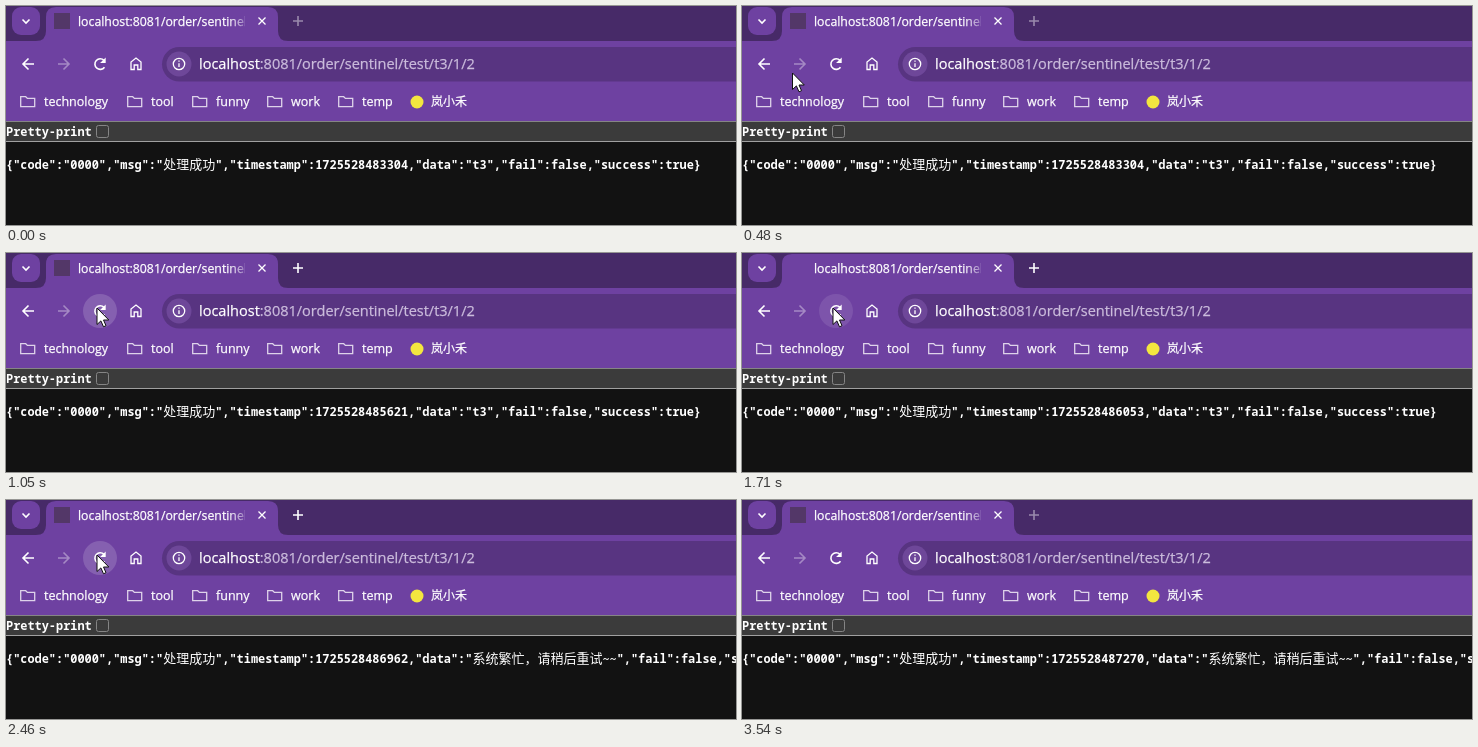
An HTML page for the animation above (3.63 s loop, 730 by 219 pixels).

```html
<!DOCTYPE html>
<html lang="en">
<head>
<meta charset="utf-8">
<title>Reload test</title>
<style>
  html, body { margin: 0; width: 100%; height: 100%; overflow: hidden; background: #121212; }
  svg { display: block; width: 100vw; height: 100vh; }
  text { fill: #fff; white-space: pre; }
  .ui { font-family: "Open Sans", "Noto Sans", "Noto Sans CJK SC", "Noto Sans CJK", sans-serif; stroke: #fff; stroke-width: .25; }
  .mono { font: 600 11.91px "Noto Sans Mono", "DejaVu Sans Mono", monospace; }
  .cjk { font: 500 13px "Noto Sans CJK SC", "Noto Sans CJK", sans-serif; }
  .line { fill: none; stroke: #fff; stroke-width: 1.6; }
  .thin { stroke-width: 1.3; }
  .dim { fill: #cbbcdc; stroke: #cbbcdc; }
</style>
</head>
<body>
<svg viewBox="0 0 730 219" preserveAspectRatio="none">
  <defs>
    <linearGradient id="fade" gradientUnits="userSpaceOnUse" x1="222" x2="241" y1="0" y2="0">
      <stop stop-color="#fff"/>
      <stop offset="1" stop-color="#fff" stop-opacity=".15"/>
    </linearGradient>
    <clipPath id="titleClip"><rect x="70" y="4" width="169" height="24"/></clipPath>
  </defs>

  <!-- tab strip -->
  <rect width="730" height="36" fill="#472a68"/>
  <rect x="6" y="1" width="28" height="28" rx="9" fill="#6e41a1"/>
  <path class="line" d="M16.500 13.500l3.500 3.500 3.500-3.500"/>
  <path d="M30 35q10 0 10-10V11q0-10 10-10H262q10 0 10 10V25q0 10 10 10z" fill="#6e41a1"/>
  <rect id="favicon" x="48" y="7" width="16" height="16" fill="#533768"/>
  <text class="ui" x="72" y="19.500" font-size="12.300" clip-path="url(#titleClip)" style="fill:url(#fade);stroke:url(#fade)">localhost:8081/order/sentinel/test</text>
  <path class="line thin" d="M252.500 11.500l7 7m0-7l-7 7"/>
  <path id="plus" class="line" d="M292 10v10m-5-5h10"/>

  <!-- toolbar -->
  <rect y="35" width="730" height="81" fill="#6e41a1"/>
  <circle id="backHover" cx="22" cy="58" r="17" fill="#fff" opacity="0"/>
  <circle id="reloadHover" cx="94" cy="58" r="17" fill="#fff" opacity="0"/>
  <path class="line" d="M28 58H17m5.500-5.500L17 58l5.500 5.500"/>
  <path class="line" opacity=".38" d="M52 58h11m-5.500-5.500L63 58l-5.500 5.500"/>
  <path class="line" d="M98.500 61.200a5.300 5.300 0 1 1-.5-6.800"/>
  <path d="M99.700 51.500v5.600h-5.600z" fill="#fff"/>
  <path class="line thin" d="M125 63.500V56l5-4 5 4v7.500h-3.200v-4.500h-3.600v4.500z"/>
  <rect x="156" y="41" width="620" height="34.500" rx="17.250" fill="#583481"/>
  <circle cx="173" cy="58" r="12.500" fill="#6e4799"/>
  <circle class="line thin" cx="173" cy="58" r="5.700"/>
  <path class="line thin" d="M173 57.200v3.800m0-6.600v1.400"/>
  <text class="ui" x="193" y="63" font-size="14.500">localhost<tspan class="dim">:8081/order/sentinel/test/t3/1/2</tspan></text>

  <!-- bookmarks -->
  <g id="marks" class="ui" font-size="12.500"></g>
  <circle cx="411" cy="96" r="6.500" fill="#f3e63f"/>
  <text class="ui" x="425" y="100" font-size="12">岚小禾</text>

  <!-- page -->
  <rect y="115" width="730" height="104" fill="#121212"/>
  <rect y="115" width="730" height="20" fill="#3b3b3b"/>
  <rect y="115" width="730" height="1" fill="#858585"/>
  <rect y="135" width="730" height="1" fill="#a0a0a0"/>
  <text class="mono" x="0" y="130">Pretty-print</text>
  <rect x="90.500" y="119.500" width="12" height="12" rx="2" fill="#3b3b3b" stroke="#858585"/>
  <text id="json" class="mono" x="0" y="163"></text>

  <path id="cursor" d="M0 0V16.500L3.900 12.900 6.500 18.800 9 17.700 6.500 12H11.800Z" fill="#fff" stroke="#111" stroke-width="1"/>
</svg>
<script>
const LOOP = 3630, STEP = 30;
const $ = id => document.getElementById(id);

const folders = [[14, "technology"], [121, "tool"], [186, "funny"], [261, "work"], [332, "temp"]];
$("marks").innerHTML = folders.map(([x, name]) =>
  `<path class="line thin" style="stroke:#ded3ea" d="M${x + .7} 90.700h5l1.700 1.700h7.300v8.300h-14z"/>` +
  `<text x="${x + 24}" y="100">${name}</text>`).join("");

// Each reload: click, response, icon shown again, timestamp, rate limited
const reloads = [
  [600, 630, 750, 1725528485251, false],
  [930, 990, 1050, 1725528485621, false],
  [1410, 1440, 1500, 1725528486053, false],
  [1710, 1740, 1860, 1725528486351, true],
  [2010, 2040, 2190, 1725528486656, false],
  [2280, 2340, 2460, 1725528486962, true],
  [2610, 2640, 2670, 1725528487270, true]
];

// Pointer path: time, x, y
const path = [
  [60, 718, 34], [150, 480, 48], [240, 170, 66], [330, 8, 74], [390, 14, 74],
  [480, 50.5, 67], [570, 91, 55], [2940, 91, 55], [2970, 126.5, 64.5], [3090, 563, 78]
];

const cjk = s => `<tspan class="cjk">${s}</tspan>`;
function body(stamp, busy) {
  const data = busy ? cjk("系统繁忙，请稍后重试") + "~~" : "t3";
  return `{"code":"0000","msg":"${cjk("处理成功")}","timestamp":${stamp},` +
    `"data":"${data}","fail":false,"success":true}`;
}

function pointer(t) {
  if (t < path[0][0] || t >= 3150) return null;
  const i = path.findIndex(p => p[0] > t);
  if (i < 0) return path[path.length - 1].slice(1);
  const [t0, x0, y0] = path[i - 1], [t1, x1, y1] = path[i];
  const k = (t - t0) / (t1 - t0);
  return [x0 + (x1 - x0) * k, y0 + (y1 - y0) * k];
}

let shown = "";
function draw(time) {
  const t = Math.floor(time % LOOP / STEP) * STEP;
  const done = reloads.filter(r => t >= r[1]).pop();
  const text = done ? body(done[3], done[4]) : body(1725528483304, false);
  if (text !== shown) $("json").innerHTML = shown = text;

  const loading = reloads.some(r => t >= r[0] && t < r[2]);
  $("favicon").setAttribute("opacity", loading ? 0 : 1);
  $("plus").setAttribute("opacity", t >= 600 && t < 3540 ? 1 : .45);

  const p = pointer(t);
  $("cursor").setAttribute("visibility", p ? "visible" : "hidden");
  if (p) $("cursor").setAttribute("transform", `translate(${p[0].toFixed(1)} ${p[1].toFixed(1)})`);

  const overBack = p && Math.hypot(p[0] - 22, p[1] - 58) < 17;
  $("backHover").setAttribute("opacity", overBack ? .1 : 0);
  const level = t < 540 ? 0 : t <= 2970 ? 1 : Math.max(0, 1 - (t - 2970) / 150);
  $("reloadHover").setAttribute("opacity", level * (loading || t >= 2970 ? .1 : .16));
}

function frame(now) {
  draw(now);
  requestAnimationFrame(frame);
}
draw(0);
requestAnimationFrame(frame);
</script>
</body>
</html>
```
